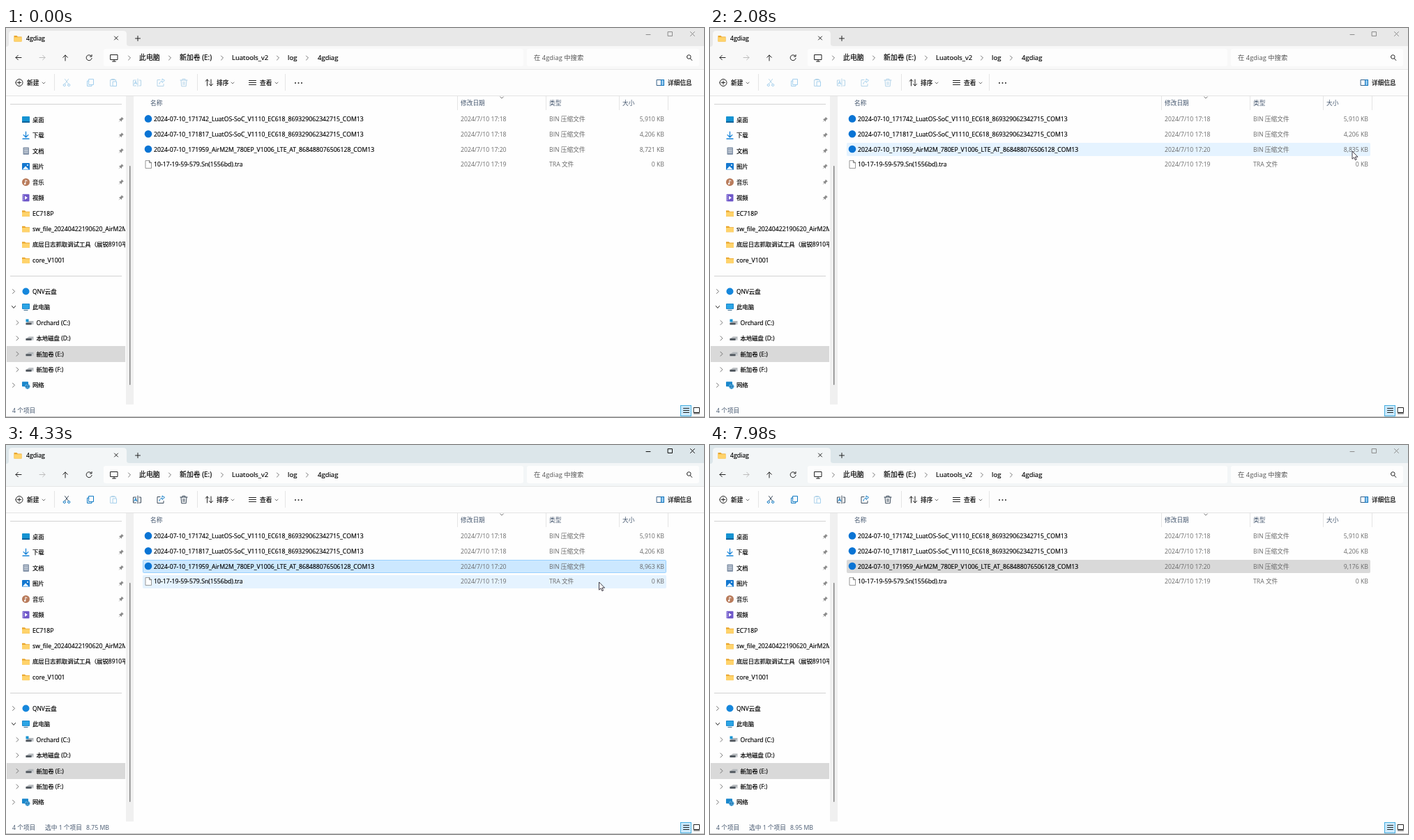
An HTML page for the animation above (8.03 s loop, 1001 by 559 pixels).

```html
<!DOCTYPE html>
<html lang="zh-CN">
<head>
<meta charset="utf-8">
<title>4gdiag</title>
<style>
html, body { margin: 0; width: 100%; height: 100%; overflow: hidden; background: #fff; }
svg { display: block; width: 1001px; height: 559px; }
text {
  font: 8.7px "Open Sans", "Noto Sans CJK SC", "Noto Sans CJK", sans-serif;
  fill: #000; stroke: #000; stroke-width: .18px; white-space: pre;
}
.big { font-size: 9.5px; }
.big.han { font-size: 9.9px; }
.side.han { font-size: 8.4px; }
.dim { fill: #6a6a6a; stroke: none; }
.head { fill: #44566e; stroke: none; }
.hint { fill: #555; stroke: none; font-size: 9.4px; }
.line { fill: none; stroke: #222; stroke-width: 1; stroke-linecap: round; stroke-linejoin: round; }
.thin { stroke: #666; stroke-width: .9; }
.tool { --ink: #b5d5ea; --accent: #a4d0ee; }
.tool.on { --ink: #3d4c5c; --accent: #0f7ac4; }
.tool path { stroke: var(--ink); }
.tool .accent { stroke: var(--accent); }
#buttons path { stroke: #8c8c8c; }
#buttons.on path { stroke: #111; }
</style>
</head>
<body>
<svg id="stage" viewBox="0 0 1001 559" xmlns="http://www.w3.org/2000/svg"></svg>
<script>
const LOOP = 8030;

// Markup helpers
const rect = (x, y, w, h, fill, more = '') =>
  `<rect x="${x}" y="${y}" width="${w}" height="${h}" fill="${fill}" ${more}/>`;
const disc = (x, y, r, fill) => `<circle cx="${x}" cy="${y}" r="${r}" fill="${fill}"/>`;
const text = (x, y, s, cls = '', more = '') =>
  `<text x="${x}" y="${y}" class="${cls}${/[\u4e00-\u9fff]/.test(s) ? ' han' : ''}" ${more}>${s}</text>`;
const path = (d, cls = '', more = '') => `<path d="${d}" class="line ${cls}" ${more}/>`;
const at = (x, y, s) => `<g transform="translate(${x} ${y})">${s}</g>`;
const right = (x, y) => path(`M${x - 1.5} ${y - 3}l3 3l-3 3`, 'thin');
const down = (x, y, r = 2) => path(`M${x - r} ${y - r / 2}l${r} ${r}l${r} ${-r}`, 'thin');
const vline = (x, y, h) => rect(x, y, 1, h, '#e5e5e5');

// Icons, drawn around their centre
const icon = {
  folder: '<path d="M-5.5-4h4l1.4 1.4h5.6v7h-11z" fill="#e9a52c"/>' + rect(-5.5, -1.8, 11, 6.3, '#ffd36b', 'rx=".8"'),
  desktop: rect(-5.5, -4.5, 11, 9, '#1593d2', 'rx=".8"') + rect(-5.5, 2.6, 11, 1.9, '#0c5f97'),
  download: path('M0-5v8M-3.4-.4L0 3l3.4-3.4M-4.5 5.2h9', '', 'style="stroke:#1683d8;stroke-width:1.3"'),
  doc: rect(-4, -5, 8.5, 10.5, '#8393a8', 'rx=".8"') + path('M-2.2-2.5h5M-2.2 0h5M-2.2 2.5h5', '', 'style="stroke:#eef2f7"'),
  picture: rect(-5.5, -5, 11, 10, '#1478d0', 'rx="1"') + '<path d="M-5 4.5L-.5-.5L4.5 4.5z" fill="#e8f5ff"/>' + disc(2.5, -2, 1, '#fff'),
  music: disc(0, 0, 5.5, '#b97c5c') + path('M-.6 2.3v-5l2.2 1', '', 'style="stroke:#fff"') + disc(-1.4, 2.3, 1.2, '#fff'),
  video: rect(-5, -5, 10, 10.5, '#6f58c9', 'rx="1"') + '<path d="M-1.5-2.6l4 2.8l-4 2.8z" fill="#fff"/>' +
    path('M-3.7-3.5v8', '', 'style="stroke:#cfc6f5;stroke-dasharray:1 1.6"'),
  cloud: disc(0, 0, 5, '#1687dc'),
  pc: rect(-5.5, -5, 11, 8, '#1a87cc', 'rx=".8"') + rect(-4.5, -4, 9, 6, '#2ca5e5') + rect(-3, 4, 6, 1, '#35688c'),
  disk: '<path d="M-1-2.5h6.5v5h-11v-2z" fill="#b4b8bc"/><path d="M-5.5 .2h8v2.8h-8z" fill="#4e555c"/>' +
    rect(3.4, .8, 1.2, 1, '#f4f6f7'),
  net: rect(-5.5, -5, 9, 7, '#1a87cc', 'rx=".8"') + disc(2.3, 1.8, 3.6, '#58b4e8') +
    path('M-1 1.8h6.6M2.3-1.4c-2 2-2 4.4 0 6.6c2-2.2 2-4.6 0-6.6', '', 'style="stroke:#175c94;stroke-width:.7"')
};
icon.sysdisk = icon.disk + rect(-5.5, -5, 4, 4, '#1593d2');
const pin = '<path d="M.8-3.8l3 3l-1.2.4l-1.5 1.6l-.3 2l-1.7-1.7l-2.8 2.3l2.3-2.8l-1.7-1.7l2-.3l1.6-1.5z" fill="#8a8a8a"/>';

function topBars() {
  const crumbs = [[191, '此电脑'], [249, '新加卷 (E:)'], [324, 'Luatools_v2'], [404, 'log'], [447, '4gdiag']];
  const tools = [
    [87, path('M-2.6 2L2.5-5M2.6 2L-2.5-5') + path('M-4.8 3.5a1.6 1.6 0 1 0 3.2 0a1.6 1.6 0 1 0-3.2 0M1.6 3.5a1.6 1.6 0 1 0 3.2 0a1.6 1.6 0 1 0-3.2 0', 'accent')],
    [121, path('M-2-5h6.5v8H-2zM-2-2.5h-2.5v7.5H2V3', 'accent')],
    [154, path('M-1.5 5h-3v-9h8v2M-2.5-5h4') + path('M-.5-1.5h5V5h-5z', 'accent')],
    [188, path('M-1.5 4.5h-4v-8h4M3 4.5h2.5v-8H3M1-5.5v11') + path('M-4 2.2l1.8-4.4L-.4 2.2M-3.3.8h2.2', 'accent')],
    [222, path('M-1-4h-4v9h9V2') + path('M-2 2c0-3 2-4 4-4v2l3.5-3.2L2-5.5v2', 'accent')],
    [255, path('M-5-3.5H5M-2-3.5v-1.7h4v1.7M-4-3.5l.8 8.8h6.4l.8-8.8M-1-1v4M1-1v4')]
  ];
  return rect(0, 0, 1001, 60, '#e8e8e8', 'id="title"') +
    '<path id="tab" d="M0 60V27q4 0 4-4V9q0-5 5-5H168q5 0 5 5v14q0 3 4 3H1001V60z" fill="#f8f8f8"/>' +
    at(17, 15, icon.folder) + text(29, 18, '4gdiag') +
    path('M155.5 12l5 5m0-5l-5 5M185.5 15h7M189 11.5v7') +
    '<g id="buttons">' + path('M918 9.5h6M949.5 5.5h6v6h-6zM981.5 5.5l6 6m0-6l-6 6') + '</g>' +
    rect(140, 30, 602, 25, '#fdfdfd', 'rx="3"') + rect(747, 30, 247, 25, '#fdfdfd', 'rx="3"') +
    path('M22 42.5h-8m3.3-3.3L14 42.5l3.3 3.3M85 47v-8m-3.3 3.3L85 39l3.3 3.3') +
    path('M48 42.5h8m-3.3-3.3l3.3 3.3l-3.3 3.3', '', 'style="stroke:#bcbcbc"') +
    path('M122.5 40.5a4 4 0 1 0 .6 3M123 38.5v2.5h-2.5') +
    path('M150 38.5h10v7h-10zM152.5 48h5M155 45.5v2.5') +
    [177, 235, 310, 390, 432].map(x => right(x, 43)).join('') +
    crumbs.map(([x, s]) => text(x, 46.3, s, 'big')).join('') +
    text(757, 46.3, '在 4gdiag 中搜索', 'hint') +
    path('M976.5 41.5a2.8 2.8 0 1 0 5.6 0a2.8 2.8 0 1 0-5.6 0M981.3 43.7l2.5 2.8') +
    rect(0, 59, 1001, 39, '#fdfdfd') + rect(0, 59, 1001, 1, '#e6e6e6') + rect(0, 97, 1001, 1, '#e3e3e3') +
    path('M14 78.5a5 5 0 1 0 10 0a5 5 0 1 0-10 0M16.5 78.5h5M19 76v5') + text(30, 82, '新建') + down(54, 79) +
    [69, 274, 400].map(x => vline(x, 66, 24)).join('') +
    tools.map(([x, s]) => `<g class="tool${x === 154 ? '' : ' live'}">${at(x, 78.5, s)}</g>`).join('') +
    path('M288.5 83v-9m-2.5 2.5l2.5-2.5l2.5 2.5M294 74v9m-2.5-2.5l2.5 2.5l2.5-2.5') + text(302, 82, '排序') + down(325, 79) +
    path('M348.5 75.5h10M348.5 78.5h10M348.5 81.5h10') + text(364, 82, '查看') + down(388, 79) +
    [415, 419.5, 424].map(x => disc(x, 79, 1, '#222')).join('') +
    path('M933.5 74.5h10v8h-10z', '', 'style="stroke:#37628a"') +
    rect(939.5, 74.5, 4, 8, '#8fc7ee', 'stroke="#1676bd"') + text(949, 82, '详细信息');
}

function sideBar() {
  // label, icon, kind: p pinned, f plain, c closed node, o open node, d drive
  const items = [
    ['桌面', 'desktop', 'p'], ['下载', 'download', 'p'], ['文档', 'doc', 'p'], ['图片', 'picture', 'p'],
    ['音乐', 'music', 'p'], ['视频', 'video', 'p'], ['EC718P', 'folder', 'f'],
    ['sw_file_20240422190620_AirM2M_780EP', 'folder', 'f'], ['底层日志抓取调试工具（展锐8910平台）', 'folder', 'f'],
    ['core_V1001', 'folder', 'f'], null, ['QNV云盘', 'cloud', 'c'], ['此电脑', 'pc', 'o'], ['Orchard (C:)', 'sysdisk', 'd'],
    ['本地磁盘 (D:)', 'disk', 'd'], ['新加卷 (E:)', 'disk', 'd'], ['新加卷 (F:)', 'disk', 'd'], ['网络', 'net', 'c']
  ];
  const row = (item, i) => {
    const y = 131.6 + i * 22.45;
    if (!item) return rect(6, 356, 160, 1, '#d2d2d2');
    const [label, name, kind] = item, dx = kind === 'd' ? 5.5 : 0;
    return at(28.5 + dx, y, icon[name]) + text(38 + dx, y + 3.2, label, 'side') +
      (kind === 'p' ? at(165, y, pin) : kind === 'o' ? path(`M8.5 ${y - 1.5}l2.5 3l2.5-3`) :
        kind === 'f' ? '' : right(11 + dx, y));
  };
  return '<clipPath id="side"><rect x="0" y="98" width="171" height="443"/></clipPath><g clip-path="url(#side)">' +
    rect(6, 109, 160, 1, '#d2d2d2') + rect(1, 457, 170, 23, '#d9d9d9') + items.map(row).join('') + '</g>' +
    rect(172, 98, 11, 443, '#f0f0f0') + rect(177, 198, 1.5, 315, '#858585', 'rx=".7"');
}

const rowY = i => 130.7 + i * 21.8;
function fileList() {
  const files = [
    ['2024-07-10_171742_LuatOS-SoC_V1110_EC618_869329062342715_COM13', '18', 'BIN 压缩文件', '5,910 KB'],
    ['2024-07-10_171817_LuatOS-SoC_V1110_EC618_869329062342715_COM13', '18', 'BIN 压缩文件', '4,206 KB'],
    ['2024-07-10_171959_AirM2M_780EP_V1006_LTE_AT_868488076506128_COM13', '20', 'BIN 压缩文件', ''],
    ['10-17-19-59-579.Sn(1556bd).tra', '19', 'TRA 文件', '0 KB']
  ];
  const heads = [[207, '名称'], [652, '修改日期'], [779, '类型'], [884, '大小']];
  const page = '<path d="M-4-5.5h5.5L4.5-2.5v8h-8.5z" fill="#fff" stroke="#8c8c8c" stroke-width=".9"/>' +
    path('M1.5-5.5v3h3', 'thin');
  return [647, 774, 879, 949].map(x => vline(x, 98, 20)).join('') +
    heads.map(([x, s]) => text(x, 110.8, s, 'head')).join('') + down(711, 100, 2.2) +
    files.map(([name, min, type, size], i) => {
      const y = rowY(i), base = y + 3.2;
      return `<rect class="row" x="196.5" y="${Math.round(y - 9.5) + .5}" width="750" height="18" rx="1" fill="none"/>` +
        (i < 3 ? disc(204, y - .3, 5.3, '#0a74d4') : at(204, y, page)) +
        text(212, base, name) + text(652, base, '2024/7/10 17:' + min, 'dim') + text(779, base, type, 'dim') +
        text(944, base, size, 'dim', `text-anchor="end" ${i === 2 ? 'id="size"' : ''}`);
    }).join('');
}

const statusBar = () => text(9, 553.2, '4 个项目', 'head') + text(56, 553.2, '选中 1 个项目', 'head pick') +
  text(115, 553.2, '', 'head pick', 'id="total"') +
  rect(967.5, 542.5, 15, 15, '#cbe9fb', 'stroke="#45aee0"') +
  path('M971.5 546.5h8M971.5 549.5h8M971.5 552.5h8') + path('M986.5 545.5h8v7h-8zM986.5 554h8') +
  rect(0, 558, 1001, 1, '#c6c6c6');

const stage = document.getElementById('stage');
stage.innerHTML = rect(0, 0, 1001, 559, '#fefefe') + topBars() + sideBar() + fileList() + statusBar() +
  '<circle id="click" r="10" fill="#f5e12c" opacity=".9"/>' +
  '<path id="cursor" d="M0 0V11.2L2.6 8.9L4.4 12.8L6.1 12L4.4 8.2H8z" fill="#fff" stroke="#2a2430" stroke-width=".9"/>';
const $ = id => document.getElementById(id);
const rows = [...stage.querySelectorAll('.row')];
const live = [...stage.querySelectorAll('.live')];
const picks = [...stage.querySelectorAll('.pick')];

// Pointer tip: time, x, y
const track = [
  [190, 915, 495], [320, 900, 290], [460, 890, 180], [660, 890, 180], [820, 905, 155], [1000, 945, 172],
  [1140, 905, 194], [1220, 888, 190], [1410, 880, 187], [1480, 885, 189], [1750, 945, 172], [2000, 930, 175],
  [2080, 921, 177], [2220, 905, 182], [2480, 890, 195], [2750, 953, 180], [3040, 897, 193.5], [3240, 897, 193.5],
  [3380, 898, 177], [3700, 898, 177], [4000, 930, 155], [4200, 862, 193], [4330, 850.5, 197], [4590, 900, 170],
  [4900, 945, 180], [5120, 903, 209], [5200, 896, 196], [5460, 900, 240], [5580, 905, 300], [5860, 905, 300],
  [6210, 915, 562]
];
// File size in KB
const sizes = [
  [0, 8721], [330, 8743], [740, 8765], [1150, 8787], [1610, 8811], [2010, 8835], [2430, 8857], [2840, 8879],
  [3240, 8900], [3700, 8921], [4050, 8942], [4330, 8963], [4590, 8985], [4870, 9007], [5130, 9029], [5460, 9050],
  [5930, 9080], [6560, 9112], [7010, 9143], [7550, 9176]
];
const STEP = 67, PICK = 3380, BLUR = 7870;

// The pointer moves in discrete steps between its keys.
function tip(t) {
  const i = track.findIndex(k => k[0] > t);
  if (i < 1) return null;
  const [t0, x0, y0] = track[i - 1], [t1, x1, y1] = track[i];
  const n = Math.max(1, Math.round((t1 - t0) / STEP));
  const u = Math.floor((t - t0) / (t1 - t0) * n) / n;
  return [x0 + (x1 - x0) * u, y0 + (y1 - y0) * u];
}

function draw(t) {
  const kb = sizes.filter(s => s[0] <= t).pop()[1];
  const picked = t >= PICK, focused = picked && t < BLUR;
  const pos = tip(t), past = tip(t - 70);

  $('size').textContent = kb.toLocaleString('en-US') + ' KB';
  $('total').textContent = (Math.floor((kb - 1) / 10.24) / 100).toFixed(2) + ' MB';
  picks.forEach(p => p.setAttribute('visibility', picked ? 'visible' : 'hidden'));
  live.forEach(g => g.classList.toggle('on', picked));
  $('buttons').classList.toggle('on', focused);
  $('title').setAttribute('fill', picked ? '#dce6ea' : '#e8e8e8');
  $('tab').setAttribute('fill', picked ? '#f3f6f7' : '#f8f8f8');

  // Row highlight trails the pointer by one step.
  rows.forEach((r, i) => {
    const hover = past && Math.abs(past[1] - rowY(i)) < 10.9;
    const chosen = picked && i === 2;
    const fill = chosen ? (focused ? '#cce8ff' : '#d9d9d9') : hover ? '#e5f3ff' : 'none';
    r.setAttribute('fill', fill);
    r.setAttribute('stroke', chosen && focused ? '#99d1ff' : fill);
  });

  const spot = pos && t >= 3240 && t < 3450;
  $('cursor').setAttribute('visibility', pos ? 'visible' : 'hidden');
  $('click').setAttribute('visibility', spot ? 'visible' : 'hidden');
  if (pos) {
    $('cursor').setAttribute('transform', `translate(${pos})`);
    $('click').setAttribute('transform', `translate(${pos})`);
  }
}

const start = performance.now();
function tick() {
  draw((performance.now() - start) % LOOP);
  requestAnimationFrame(tick);
}
tick();
</script>
</body>
</html>
```
